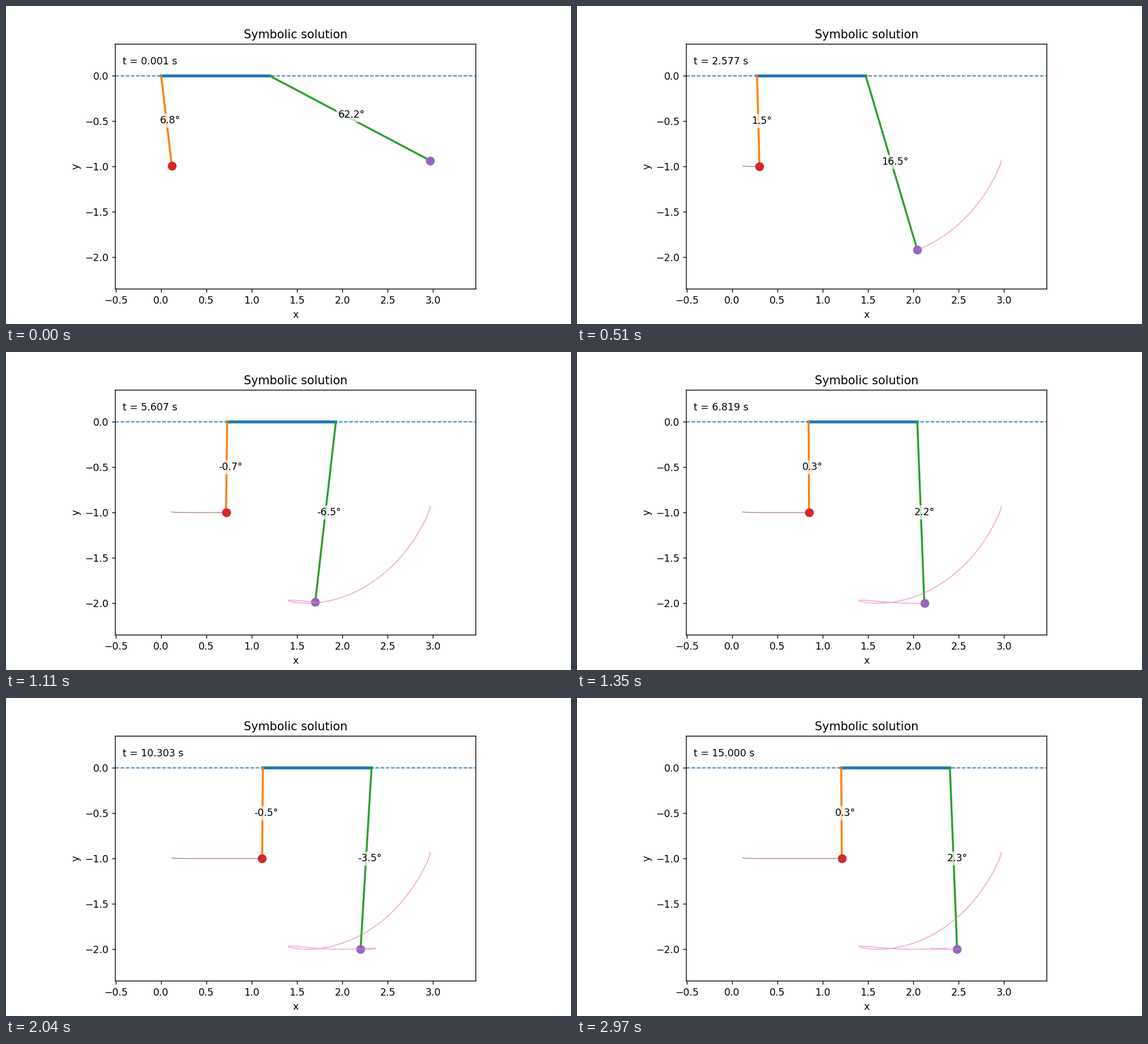
A matplotlib script that plays this animation: 998 px wide and 561 px high, repeating every 3000 ms.

```python
import numpy as np
import matplotlib.pyplot as plt
from matplotlib.animation import FuncAnimation

W, H, DPI = 998, 561, 124.75
FRAMES, INTERVAL = 100, 30
L1, L2, GAP = 1.0, 2.0, 1.2

# Turning points of the long pendulum: (seconds, degrees)
TURNS = [(0, 62.2), (4.435, -10.8), (7.93, 6.1),
         (10.9, -4.5), (14.13, 3.6), (17.05, -2.9)]


def swing(t):
    """Half a cosine from each turning point to the next."""
    for (t0, a), (t1, b) in zip(TURNS, TURNS[1:]):
        if t <= t1:
            return (a + b) / 2 + (a - b) / 2 * np.cos(np.pi * (t - t0) / (t1 - t0))


time = np.linspace(0.001, 15, FRAMES)
deg2 = np.array([swing(t) for t in time])

# The short pendulum follows the long one at a slowly growing ratio
deg1 = deg2 * (0.0805 + 0.0048 * time + 0.0288 * np.exp(-time ** 2))

# The cart drifts to a halt, recoils against the swing and starts gently
recoil = 0.0015
start = (recoil * TURNS[0][1] - 0.1 * time) * np.exp(-(time / 2.35) ** 2)
cart = 1.217 * np.sin(np.pi / 2 * time / 13.9) - recoil * deg2 + start

th1, th2 = np.radians(deg1), np.radians(deg2)
x1, y1 = cart + L1 * np.sin(th1), -L1 * np.cos(th1)
x2, y2 = cart + GAP + L2 * np.sin(th2), -L2 * np.cos(th2)

plt.rcParams["path.snap"] = False
fig, ax = plt.subplots(figsize=(W / DPI, H / DPI), dpi=DPI)
ax.set_aspect("equal")
ax.set_xlim(-0.506, 3.474)
ax.set_ylim(-2.35, 0.35)
ax.set_xlabel("x")
ax.set_ylabel("y")
ax.set_title("Symbolic solution")
ax.axhline(0, ls="--", lw=1, color="C0")


def make_line(color, fmt="-", **style):
    return ax.plot([], [], fmt, color=color, **style)[0]


def make_label():
    box = dict(facecolor="white", edgecolor="none", alpha=0.7, pad=2)
    return ax.text(0, 0, "", ha="center", va="center", bbox=box)


bar = make_line("C0", lw=3)
rod1, rod2 = make_line("C1", lw=2), make_line("C2", lw=2)
bob1, bob2 = make_line("C3", "o", ms=8), make_line("C4", "o", ms=8)
trace1 = make_line("C5", lw=1, alpha=0.6)
trace2 = make_line("C6", lw=1, alpha=0.6)
label1, label2 = make_label(), make_label()
clock = ax.text(0.02, 0.95, "", transform=ax.transAxes, va="top")


def place_pendulum(rod, bob, label, pivot, x, y, angle, off=0.04):
    rod.set_data([pivot, x], [0, y])
    bob.set_data([x], [y])
    label.set_position(((pivot + x) / 2 + off * np.cos(angle),
                        y / 2 + off * np.sin(angle)))
    label.set_text(f"{np.degrees(angle):.1f}°")


def update(i):
    c = cart[i]
    bar.set_data([c, c + GAP], [0, 0])
    place_pendulum(rod1, bob1, label1, c, x1[i], y1[i], th1[i])
    place_pendulum(rod2, bob2, label2, c + GAP, x2[i], y2[i], th2[i])
    trace1.set_data(x1[:i + 1], y1[:i + 1])
    trace2.set_data(x2[:i + 1], y2[:i + 1])
    clock.set_text(f"t = {time[i]:.3f} s")
    return bar, rod1, rod2, bob1, bob2, trace1, trace2, clock, label1, label2


anim = FuncAnimation(fig, update, frames=FRAMES, interval=INTERVAL,
                     repeat=True, repeat_delay=0)
plt.show()
```
